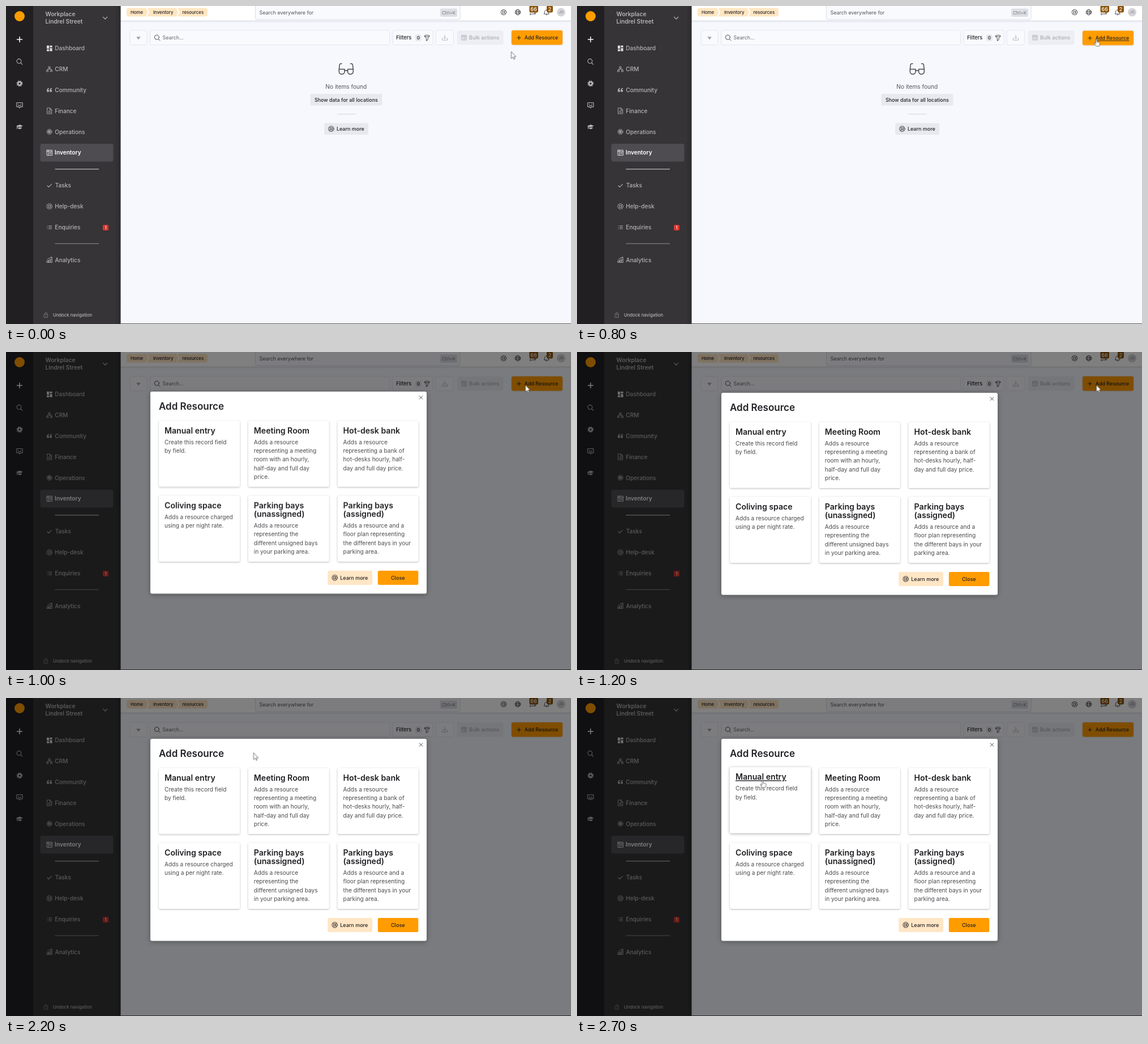
An HTML page that plays this animation: 998 px wide and 561 px high, repeating every 3 s.

```html
<!DOCTYPE html>
<html lang="en">
<head>
<meta charset="utf-8">
<title>Add resource</title>
<style>
html, body { margin: 0; width: 100%; height: 100%; overflow: hidden; background: #f6f8fe; }
svg { display: block; width: 100vw; height: 100vh; }
text { font: 500 8.9px Inter, sans-serif; fill: #232126; }
.mid { text-anchor: middle; }
.line { fill: none; stroke: currentColor; stroke-linecap: round; stroke-linejoin: round; }
.rail { color: #b9b8ba; }
.nav { color: #b4b3b5; }
.nav text { font-size: 10.13px; fill: #b4b3b5; }
.nav .on { fill: #fff; font-weight: 600; }
.nav .org { font-size: 10.2px; font-weight: 600; }
.crumb text { font-size: 7.9px; }
.soft { fill: #f9fafe; stroke: #dfe2e9; stroke-width: .8; }
.card rect { fill: #fff; filter: drop-shadow(0 1px 1.6px rgba(0, 0, 0, .28)); }
.card text { font-size: 10.13px; font-weight: 400; fill: #4b494e; }
.card .h { font-size: 14.1px; font-weight: 600; fill: #201e22; }

.add, .add text, .veil, .dialog, .hover, .hover rect, .hover .h, .cursor, .arrow, .hand {
  animation: 3s step-end infinite;
}
.add { animation-name: press; }
.add text { animation-name: add-line; }
.veil { animation-name: veil; }
.dialog { animation-name: dialog; }
.hover { animation-name: lift; }
.hover rect { animation-name: glow; }
.hover .h { animation-name: card-line; }
.cursor { animation-name: move; }
.arrow { animation-name: arrow; }
.hand { animation-name: hand; }

@keyframes press {
  0% { transform: none; }
  13.33% { transform: translateY(-.5px); }
  16.66% { transform: translateY(-1px); }
  23.33% { transform: translateY(.3px); }
  26.66% { transform: translateY(.6px); }
  30%, 100% { transform: none; }
}
@keyframes add-line {
  0%, 30%, 100% { text-decoration-line: none; }
  13.33% { text-decoration-line: underline; }
}
@keyframes veil {
  0% { opacity: 0; }
  30% { opacity: .08; }
  33.33%, 100% { opacity: .5; }
}
@keyframes dialog {
  0% { opacity: 0; transform: translateY(20px); }
  30% { opacity: .11; transform: translateY(11.5px); }
  33.33% { opacity: 1; transform: translateY(-2.2px); }
  36.66% { opacity: 1; transform: translateY(-.7px); }
  40%, 100% { opacity: 1; transform: none; }
}
@keyframes lift {
  0% { transform: none; }
  80% { transform: translateY(-.6px); }
  83.33% { transform: translateY(-1.2px); }
  86.66%, 100% { transform: translateY(-1.5px); }
}
@keyframes glow {
  0% { filter: drop-shadow(0 1px 1.6px rgba(0, 0, 0, .28)); }
  80%, 100% { filter: drop-shadow(0 1.5px 2.4px rgba(0, 0, 0, .34)); }
}
@keyframes card-line {
  0% { text-decoration-line: none; }
  80%, 100% { text-decoration-line: underline; }
}
@keyframes move {
  0% { transform: translate(892.5px, 80.5px); }
  3.33% { transform: translate(893.5px, 79.5px); }
  6.66% { transform: translate(898px, 76px); }
  10% { transform: translate(905px, 70.5px); }
  13.33% { transform: translate(912px, 64px); }
  16.66% { transform: translate(916px, 60px); }
  20% { transform: translate(917.5px, 58.3px); }
  43.33% { transform: translate(919px, 58px); }
  46.66% { transform: translate(920.5px, 57.7px); }
  50% { transform: translate(921px, 57.5px); }
  60% { transform: translate(907px, 57.5px); }
  63.33% { transform: translate(858px, 58px); }
  66.66% { transform: translate(727px, 60px); }
  70% { transform: translate(562px, 70px); }
  73.33% { transform: translate(437.3px, 96.5px); }
  76.66% { transform: translate(375.5px, 115.5px); }
  80% { transform: translate(350px, 130px); }
  83.33% { transform: translate(336px, 139.5px); }
  86.66% { transform: translate(330px, 144px); }
  90%, 100% { transform: translate(328px, 145.3px); }
}
@keyframes arrow {
  0%, 30% { opacity: 1; }
  13.33%, 80%, 100% { opacity: 0; }
}
@keyframes hand {
  0%, 30% { opacity: 0; }
  13.33%, 80%, 100% { opacity: 1; }
}
</style>
</head>
<body>
<svg viewBox="0 0 998 561" preserveAspectRatio="none">
<defs>
  <g id="buoy" class="line">
    <circle r="4.7"/><circle r="2"/>
    <path d="M-3.3-3.3l1.9 1.9M3.3-3.3l-1.9 1.9M-3.3 3.3l1.9-1.9M3.3 3.3l-1.9-1.9"/>
  </g>
  <path id="plus" class="line" d="M-1 0H1M0-1V1" vector-effect="non-scaling-stroke"/>
  <path id="chev" d="M-3.2 3h2.4l4 8-4 8h-2.4l4-8z" fill="#fff"/>
  <linearGradient id="edge">
    <stop stop-color="#000" stop-opacity="0"/><stop offset="1" stop-color="#000" stop-opacity=".18"/>
  </linearGradient>
  <linearGradient id="under" x2="0" y2="1">
    <stop stop-color="#5a6078" stop-opacity=".16"/><stop offset="1" stop-color="#5a6078" stop-opacity="0"/>
  </linearGradient>
</defs>

<rect width="998" height="561" fill="#f6f8fe"/>

<!-- header -->
<rect x="202" width="796" height="25.5" fill="#fff"/>
<rect x="202" y="25.5" width="796" height="4" fill="url(#under)"/>
<g class="crumb">
  <rect x="213" y="3.5" width="143" height="15" rx="4" fill="#ffe6c1"/>
  <use href="#chev" x="250"/><use href="#chev" x="303.5"/>
  <text x="219.9" y="13.9">Home</text>
  <text x="259.9" y="13.9">Inventory</text>
  <text x="311.5" y="13.9">resources</text>
</g>
<rect class="soft" x="440.5" y="-4" width="361.5" height="28" rx="3" style="stroke:#d3d6de"/>
<text x="447.5" y="14.6" style="font-weight:400;fill:#55545a">Search everywhere for</text>
<rect x="767" y="4.5" width="30" height="14.5" rx="2" fill="#dddfe5"/>
<text class="mid" x="782" y="14.6" style="font-size:7.9px;font-weight:400;fill:#77767c">Ctrl+K</text>
<g color="#3c3a40" stroke-width=".9">
  <use href="#buoy" x="879" y="11"/>
  <g class="line" transform="translate(904 11)">
    <circle r="4.7"/><ellipse rx="2.1" ry="4.7"/><path d="M-4.5-1.5h9M-4.5 1.5h9"/>
  </g>
  <path class="line" d="M926 12v4l2.2-2h5.3v-3M934 14h1.5V11"/>
  <path class="line" d="M950.5 13.8c1.2-1.2.9-2.5 1.1-4 .2-1.7 1.5-2.9 3.2-2.9s3 1.200 3.200 2.900c.2 1.500-.1 2.800 1.100 4zM953.700 15.500q1.100 1 2.200 0"/>
</g>
<g fill="#8b5204">
  <rect x="924.5" y="-1" width="15.500" height="12.500" rx="3"/>
  <rect x="955" y="-1" width="11" height="12.500" rx="3"/>
</g>
<text class="mid" x="932.200" y="8.800" style="fill:#fff">66</text>
<text class="mid" x="960.500" y="8.800" style="fill:#fff">2</text>
<circle cx="980.500" cy="11" r="7.600" fill="#d5d5d9"/>
<text class="mid" x="980.500" y="13.300" style="font-size:6px;fill:#85848a">JO</text>

<!-- toolbar -->
<g class="soft">
  <rect x="219" y="43" width="30" height="25.500" rx="3"/>
  <rect x="254.500" y="43" width="423" height="25.500" rx="3"/>
  <rect x="683" y="43" width="71" height="25.500" rx="3"/>
  <rect x="759" y="43" width="31.500" height="25.500" rx="3"/>
</g>
<path d="M230.300 54.300h7.400L234 59.400z" fill="#a3a4aa"/>
<g class="line" color="#4a494f">
  <circle cx="266.400" cy="55.200" r="4"/><path d="M269.400 58.300l2.700 2.700"/>
</g>
<text x="276.500" y="59.100" style="font-weight:400;fill:#66656b">Search...</text>
<text x="688.900" y="59.200" style="font-size:9.300px">Filters</text>
<rect x="723" y="50.300" width="10.500" height="11.500" rx="2.500" fill="#e4e6ec"/>
<text class="mid" x="728.300" y="59.100" style="font-size:8.200px">0</text>
<path class="line" color="#333137" stroke-width=".9" d="M739.300 53.200c0-2.400 8.700-2.400 8.700 0 0 1.400-3 2.600-3 4.300v2.300l-2.600 1.500v-3.800c0-1.700-3.100-2.900-3.100-4.300zM739.300 53.200c1.300 1.600 7.400 1.600 8.700 0"/>
<path class="line" color="#b5b6bc" d="M775 51.300v6M772.700 55.200l2.300 2.300 2.300-2.300M770.500 57v3.200h9V57"/>
<rect x="797" y="43" width="81.500" height="25.500" rx="3" fill="#eceef4"/>
<g class="line" color="#aaabb1" stroke-width=".9">
  <rect x="805" y="51.700" width="8" height="8.300" rx=".6"/>
  <path d="M805 53.700h8M807 55.700h.2M808.700 55.700h2.500M807 57.900h.2M808.700 57.900h2.500"/>
</g>
<text x="818" y="59.200" style="font-size:9.150px;fill:#a9aab0">Bulk actions</text>
<g class="add">
  <rect x="893" y="43" width="90" height="25.500" rx="3" fill="#ff9c00" style="filter:drop-shadow(0 .5px 1px rgba(0,0,0,.2))"/>
  <path class="line" color="#232126" stroke-width="1.100" d="M902.700 56h6.600M906 52.700v6.600"/>
  <text x="915.800" y="59.200">Add Resource</text>
</g>

<!-- empty state -->
<path class="line" color="#48474d" stroke-width="1.500" d="M593 101.700h-1.500q-2 0-2.300 2L588.300 112M608.500 101.700h1.500q2 0 2.300 2L613.300 112M588.300 111.500h9.700v4.300a4.500 4.500 0 0 1-4.500 4.500h-.7a4.500 4.500 0 0 1-4.500-4.500zM603.600 111.500h9.700v4.300a4.500 4.500 0 0 1-4.500 4.500h-.7a4.500 4.500 0 0 1-4.500-4.500zM598 114.500q2.800-1.600 5.600 0"/>
<text class="mid" x="600.800" y="145.800" style="font-size:10.130px;font-weight:400;fill:#55545a">No items found</text>
<g fill="#e7e9ef">
  <rect x="537.500" y="155" width="127" height="20.500" rx="2"/>
  <rect x="562" y="206.500" width="78" height="20.500" rx="2"/>
</g>
<text class="mid" x="600.900" y="168.500">Show data for all locations</text>
<path d="M585 190.800h32.500" stroke="#d3d5db"/>
<use href="#buoy" x="574.400" y="216.700" color="#333137"/>
<text x="583.900" y="219.900" style="font-size:9px">Learn more</text>

<!-- rail -->
<rect width="48" height="561" fill="#211f22"/>
<circle cx="24" cy="18" r="9" fill="#ff9c00"/>
<path class="line" color="#fff" stroke-width="1.500" d="M19.500 59h9M24 54.500v9"/>
<g class="rail">
  <g class="line" stroke-width="1.100">
    <circle cx="23" cy="97.300" r="3.900"/><path d="M26 100.300l2.800 2.800"/>
    <path d="M19.500 170.500h9q.7 0 .7.700v6q0 .7-.7.700h-2.700l-1.800 2-1.800-2h-2.700q-.7 0-.7-.7v-6q0-.7.700-.7zM21.800 172.900v.4M26.200 172.900v.4M21.800 175.200q2.200 1.500 4.400 0"/>
  </g>
  <g class="line" transform="translate(24 136.800)">
    <circle r="2.900" stroke-width="2.500"/>
    <circle r="4.700" stroke-width="1.500" stroke-dasharray="1.840 1.850" style="stroke-linecap:butt"/>
  </g>
  <path fill="currentColor" d="M18 211.700l6.300-2.500 5.700 2.200-5.900 2.600-3.600-1.400v3.200l-1.400 1.700v-5.100zM21.500 214l2.700 1 3.300-1.300v2.400q-3 2.200-6 .2z"/>
</g>

<!-- sidebar -->
<rect x="48" width="154.500" height="561" fill="#363437"/>
<rect x="192" width="10.500" height="561" fill="url(#edge)"/>
<g class="nav">
  <text class="org" x="69.500" y="18.300">Workplace</text>
  <text class="org" x="69.500" y="30.800">Lindrel Street</text>
  <path class="line" stroke-width="1.200" d="M171.500 19.300l3.700 3.700 3.700-3.700"/>
  <rect x="60.500" y="243" width="129" height="31.500" rx="4" fill="#4e4c50"/>

  <text x="86.300" y="78.100">Dashboard</text>
  <text x="86.300" y="115">CRM</text>
  <text x="86.300" y="151.800">Community</text>
  <text x="86.300" y="188.700">Finance</text>
  <text x="86.300" y="225.500">Operations</text>
  <text class="on" x="86.100" y="262.400">Inventory</text>
  <text x="86.700" y="320.300">Tasks</text>
  <text x="86.300" y="357.200">Help-desk</text>
  <text x="86.300" y="394">Enquiries</text>
  <text x="86.500" y="451.900">Analytics</text>

  <path d="M86.500 287.800H164" stroke="#dcdbdd"/>
  <path d="M86.500 419.200H164" stroke="#8f8e91"/>

  <path fill="#dcdbdd" d="M72 69.700h4.200v5.600H72zM77.400 69.700h4.200v3.300h-4.200zM72 76.500h4.200v3.300H72zM77.400 74.200h4.200v5.600h-4.200z"/>
  <g class="line" stroke-width=".9">
    <path d="M75.300 107h2.800v2.600h-2.800zM72 113.300h2.600v2.500H72zM78.900 113.300h2.600v2.500h-2.600zM76.700 109.600v1.800M73.300 113.300v-1.900h6.900v1.900"/>
    <path d="M73 180h4.700l3 3v7H73zM77.500 180v3.200h3.200M74.900 185.300h3.800M74.900 187.500h3.800"/>
    <circle cx="76.700" cy="221.900" r="4.400" stroke-dasharray="1.900 .860"/>
    <rect x="74.400" y="219.600" width="4.600" height="4.600" rx=".5"/>
    <path d="M73 317l2.400 2.400 5-5.100" stroke-width="1.100"/>
    <path d="M73 387.800h.3M75.500 387.800h5.200M73 390.400h.3M75.500 390.400h5.200M73 393h.3M75.500 393h5.200"/>
    <path d="M72.500 449.500h2v3h-2zM75.900 448h2v4.500h-2zM79.300 446.500h2v6h-2zM73 447l3.500-2.300 4.500-1.200M79 443.200h2.200v2"/>
    <path d="M67.500 543.700h6v5.600h-6zM68.700 543.500v-1.200q0-1.700 1.800-1.700t1.800 1.700v1.200M70.500 546v1.200" stroke="#7b7a7d"/>
  </g>
  <rect x="75.300" y="220.500" width="2.800" height="2.800" fill="currentColor"/>
  <path fill="currentColor" d="M76 144.600q-3.800.7-3.800 4.200v1.900q0 .9.900.9h1.900q1 0 1-1v-1.500q0-1-1-1h-1q.1-1.700 2-2.200zM81.100 144.600q-3.800.7-3.800 4.200v1.900q0 .9.900.9h1.900q1 0 1-1v-1.500q0-1-1-1h-1q.1-1.700 2-2.200z"/>
  <g class="line" color="#e9e8ea" stroke-width=".9">
    <rect x="72" y="254.200" width="9.500" height="9.300" rx=".5"/>
    <path d="M72 256.400h9.500M74.800 254.400v9M76.500 258.500h3.500M76.500 260.700h3.500"/>
  </g>
  <use href="#buoy" x="76.700" y="353.500" stroke-width=".9"/>
  <rect x="171" y="386" width="10" height="10" rx="2" fill="#d8362f"/>
  <text class="mid" x="176" y="393.700" style="font-size:7.500px;fill:#fff">1</text>
  <text x="82.900" y="548.100" style="font-size:7.750px">Undock navigation</text>
</g>
<rect x="202.500" y="560.200" width="795.500" height=".8" fill="#2b2a2d"/>

<rect class="veil" width="998" height="561"/>

<!-- dialog -->
<g class="dialog">
  <rect x="255" y="72" width="488" height="356.500" rx="3" fill="#fff" style="filter:drop-shadow(0 2px 4px rgba(0,0,0,.3))"/>
  <text x="270" y="103.700" style="font-size:17px;font-weight:600">Add Resource</text>
  <path class="line" color="#48474d" d="M730.200 79.700l5.600 5.600M735.800 79.700l-5.600 5.600"/>
  <g id="cards"></g>
  <rect x="568.300" y="388" width="78.700" height="25" rx="2.500" fill="#ffe6c5"/>
  <use href="#buoy" x="580.700" y="400.400" color="#232126"/>
  <text x="590.200" y="403.600" style="font-size:9px">Learn more</text>
  <rect x="656.800" y="388" width="71.500" height="25" rx="2.500" fill="#ff9c00"/>
  <text class="mid" x="692.300" y="403.600" style="font-size:9.100px">Close</text>
</g>

<g class="cursor" fill="#fff" stroke="#333" stroke-width=".7" stroke-linejoin="round">
  <path class="arrow" d="M0 0V12.200L2.900 9.600 4.700 13.600 6.500 12.800 4.800 8.900H8.300Z"/>
  <path class="hand" d="M-1.100 1.100a1.100 1.100 0 0 1 2.200 0V5l3.600.8c1 .2 1.500.9 1.400 1.900l-.5 3.400c-.1.900-.7 1.600-1.600 1.600H.6c-.6 0-1.100-.3-1.400-.8L-4 8.400c-.8-1.200.6-2 1.400-1.300l1.500 1.300Z"/>
</g>
</svg>
<script>
// Heading lines, then body lines, separated by "/".
const cards = [
  ["Manual entry", "Create this record field/by field."],
  ["Meeting Room", "Adds a resource/representing a meeting/room with an hourly,/half-day and full day/price."],
  ["Hot-desk bank", "Adds a resource/representing a bank of/hot-desks hourly, half-/day and full day price."],
  ["Coliving space", "Adds a resource charged/using a per night rate."],
  ["Parking bays/(unassigned)", "Adds a resource/representing the/different unsigned bays/in your parking area."],
  ["Parking bays/(assigned)", "Adds a resource and a/floor plan representing/the different bays in your/parking area."]
];
const LEAD = 15.25;

const lines = (list, y, cls) => list
  .map((s, i) => `<text class="${cls}" x="10" y="${y + i * LEAD}">${s}</text>`).join("");

const card = ([title, body], i) => {
  const head = title.split("/");
  const x = 270 + (i % 3) * 157.8, y = 123.5 + Math.floor(i / 3) * 132;
  return `<g transform="translate(${x} ${y})"><g class="card${i ? "" : " hover"}">
    <rect width="143" height="116.500" rx="2.500"/>
    ${lines(head, 22.2, "h")}${lines(body.split("/"), 41.4 + (head.length - 1) * LEAD, "b")}</g></g>`;
};

document.getElementById("cards").innerHTML = cards.map(card).join("");
</script>
</body>
</html>
```
